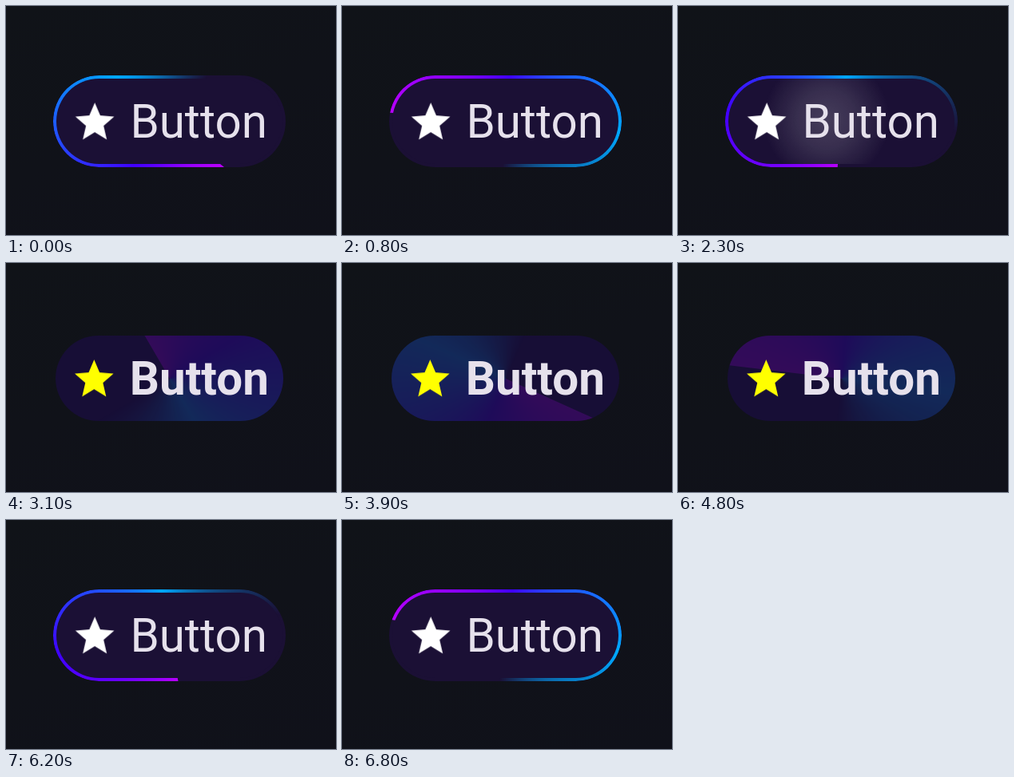
These frames come from a looping animation (413x287 px, 6.9 s). An HTML page:

```html
<!DOCTYPE html>
<html lang="en">
<head>
<meta charset="utf-8">
<title>Glowing button</title>
<style>
  html, body {
    margin: 0;
    width: 100%;
    height: 100%;
    overflow: hidden;
    background: linear-gradient(160deg, #101318, #10111a);
  }

  .pill, .spin, .core, .ripple, svg { position: absolute; }

  .pill, .spin, .core, .ripple, .star, .label {
    animation: 6.9s step-end infinite;
  }

  .pill {
    left: 59px;
    top: 87px;
    width: 291px;
    height: 115px;
    overflow: hidden;
    border-radius: 57.5px;
    background: #1b1035;
    animation-name: pill;
  }

  /* Sweep behind the pill: a ring when off, a dim fill when on */
  .spin {
    left: -24.5px;
    top: -112.5px;
    width: 340px;
    height: 340px;
    background: conic-gradient(#b800ff, #4000ff 90deg, #00a8ff 180deg, rgba(0, 168, 255, 0) 270deg);
    animation-name: spin, dim;
    animation-duration: 6.9s;
    animation-timing-function: steps(69), step-end;
  }

  .core {
    inset: 4px;
    overflow: hidden;
    border-radius: 53.5px;
    background: #1b1035;
    animation-name: core;
  }

  .ripple {
    left: 43px;
    top: -29px;
    width: 160px;
    height: 160px;
    border-radius: 50%;
    background: radial-gradient(closest-side, rgba(255, 255, 255, .19), rgba(255, 255, 255, .13) 45%, rgba(255, 255, 255, 0));
    opacity: 0;
    animation-name: ripple;
  }

  svg { left: 0; top: 0; }

  .star { fill: #fff; animation-name: star; }

  .label {
    font: 400 58.3px Roboto, sans-serif;
    fill: #e6e1ec;
    animation-name: label;
  }

  @keyframes spin {
    from { transform: rotate(130deg); }
    to { transform: rotate(1376deg); }
  }

  /* Switched on at 2.5 s, off at 5.5 s */
  @keyframes pill {
    0%, 79.7% { clip-path: none; background: #1b1035; }
    36.23% { clip-path: inset(4px 3px round 53.5px); background: #170e36; }
  }
  @keyframes dim {
    0%, 79.7% { opacity: 1; }
    36.23% { opacity: .18; }
  }
  @keyframes core {
    0%, 79.7% { background-color: #1b1035; }
    36.23% { background-color: transparent; }
  }
  @keyframes star {
    0%, 79.7% { fill: #fff; transform: none; }
    36.23% { fill: #ff0; transform: translateX(-.8px); }
  }
  @keyframes label {
    0%, 79.7% { font-weight: 400; transform: none; }
    36.23% { font-weight: 700; transform: translateX(-.6px); }
  }

  /* Each tap spreads a soft light, which then fades */
  @keyframes ripple {
    0% { opacity: 0; transform: scale(.5); }
    31.88%, 76.81% { opacity: .8; transform: scale(.5); }
    33.33%, 78.26% {
      opacity: 1;
      transform: scale(1);
      animation-timing-function: steps(3);
    }
    37.68%, 82.6% {
      opacity: .55;
      transform: scale(6);
      animation-timing-function: steps(4);
    }
    43.48%, 88.4% { opacity: 0; transform: scale(6); }
    100% { opacity: 0; transform: scale(.5); }
  }
</style>
</head>
<body>
  <div class="pill">
    <div class="spin"></div>
    <div class="core"><div class="ripple"></div></div>
  </div>
  <svg width="413" height="287" viewBox="0 0 413 287">
    <g class="star">
      <path transform="translate(81.9 116.3) scale(2.43)"
        d="M12 17.27 18.18 21l-1.64-7.03L22 9.24l-7.19-.61L12 2 9.19 8.63 2 9.24l5.46 4.73L5.82 21z"/>
    </g>
    <text class="label" x="155.4" y="165">Button</text>
  </svg>
</body>
</html>
```
